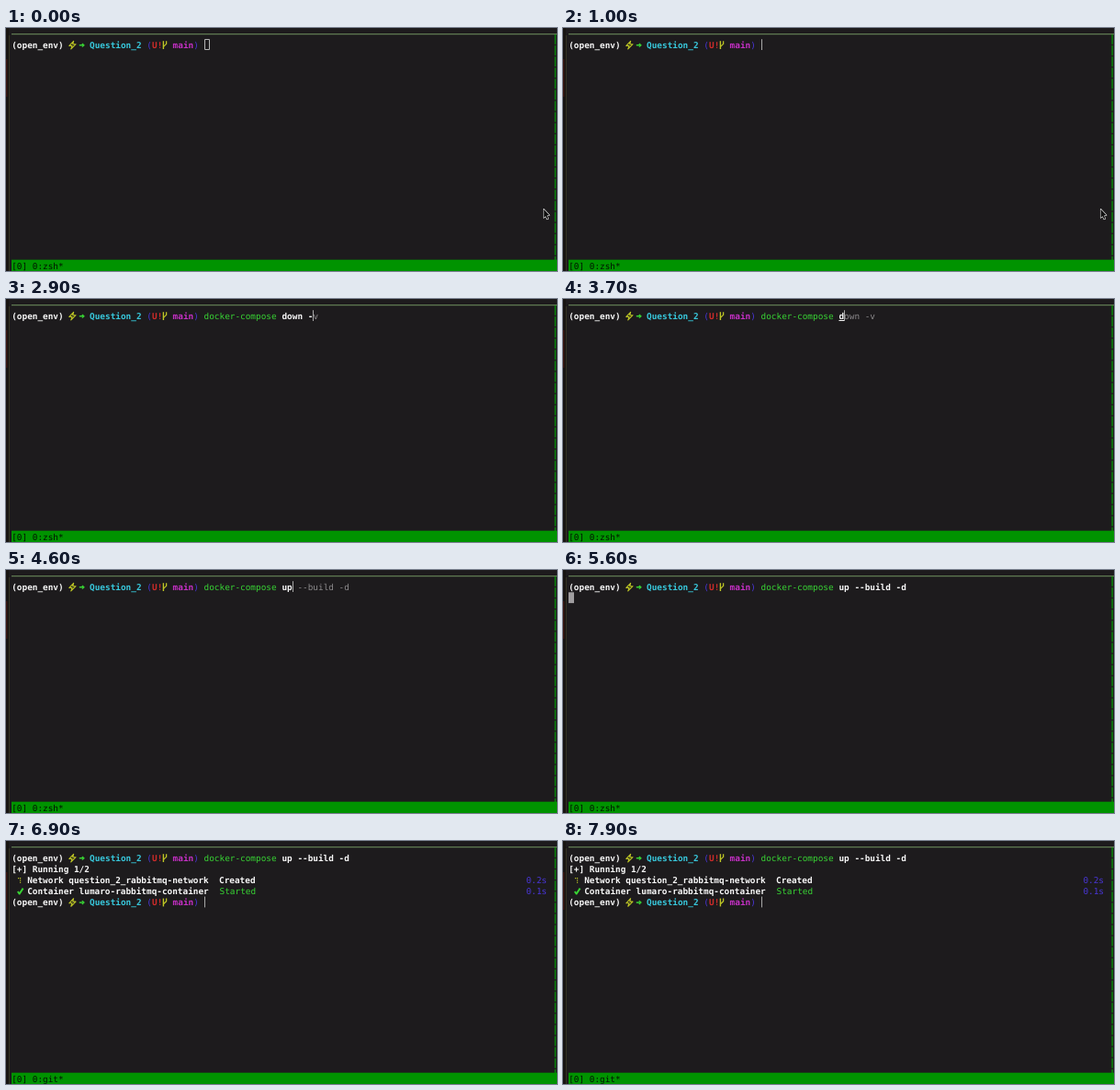
Recreate the animation shown at these times as an HTML page with a canvas. Size 600 by 265 pixels, loop 8000 ms.

```html
<!DOCTYPE html>
<html lang="en">
<head>
<meta charset="utf-8">
<title>Terminal</title>
<style>
html, body { margin: 0; width: 100%; height: 100%; overflow: hidden; background: #1d1b1d; }
canvas { display: block; }
</style>
</head>
<body>
<canvas id="stage" width="600" height="265"></canvas>
<script>
const ctx = document.getElementById('stage').getContext('2d');
const LOOP = 8000;
const FONT_SIZE = 9.4, CELL = FONT_SIZE * 0.602;
const LEFT = 6.2, ROW = 12.1, BASELINE = 22;
const COLOR = {
  white: '#f8f8f8', gray: '#8c8a8c', green: '#38d334', cyan: '#38c8dc', blue: '#4936d8',
  red: '#d02c2a', yellow: '#bec625', magenta: '#c630c6', bar: '#009300'
};

const DOWN = 'docker-compose down -v';
const UP = 'docker-compose up --build -d';
// Each step: start time, number of typed characters, full suggested command.
const STEPS = [
  [0, 0, ''], [1600, 1, DOWN], [1800, 2, DOWN], [2100, 22, DOWN],
  [2900, 21, DOWN], [3200, 20, DOWN], [3300, 19, DOWN], [3400, 18, DOWN],
  [3500, 17, DOWN], [3700, 16, DOWN], [4000, 15, DOWN],
  [4400, 16, UP], [4500, 17, UP], [4900, 28, UP]
];
const FOCUS = 300, POINTER_HIDDEN = 1400, ENTER = 5600, OUTPUT = 5900, DONE = 6000;
const PROMPT_COLS = 37;

const colX = col => LEFT + col * CELL;
const rowTop = row => 12.2 + row * ROW;

function rect(x, y, w, h, color) {
  ctx.fillStyle = color;
  ctx.fillRect(x, y, w, h);
}

function write(text, col, row, color, weight = 'bold') {
  ctx.font = `${weight} ${FONT_SIZE}px "DejaVu Sans Mono", monospace`;
  ctx.fillStyle = color;
  ctx.fillText(text, colX(col), BASELINE + row * ROW);
}

function trace(points, color, width, close) {
  ctx.beginPath();
  points.forEach(([x, y]) => ctx.lineTo(x, y));
  if (close) ctx.closePath();
  ctx.strokeStyle = color;
  ctx.lineWidth = width;
  ctx.stroke();
}

function drawPrompt(row) {
  write('(open_env)', 0, row, COLOR.white);
  write('Question_2', 15, row, COLOR.cyan);
  write('(', 26, row, COLOR.blue, 'normal');
  write('U!', 27, row, COLOR.red);
  write('main', 31, row, COLOR.magenta);
  write(')', 35, row, COLOR.blue, 'normal');

  ctx.save();
  ctx.translate(0, row * ROW);
  const bolt = [[73.6, 14.3], [68.8, 19.4], [72, 19.4], [70.8, 22.9], [76, 17.7], [72.8, 17.7]];
  trace(bolt, COLOR.yellow, 1.1, true);
  trace([[79.8, 18.7], [84, 18.7]], COLOR.green, 1.5);
  trace([[82.8, 16.9], [85, 18.7], [82.8, 20.5]], COLOR.green, 1.3);
  trace([[171.4, 14.2], [171.4, 23]], COLOR.yellow, 1.4);
  trace([[174.6, 14.2], [174.6, 17.4], [171.4, 20.4]], COLOR.yellow, 1.3);
  ctx.restore();
}

function drawCursor(col, row, style) {
  const x = Math.round(colX(col)), y = rowTop(row);
  if (style === 'hollow') {
    ctx.strokeStyle = '#b5b5b5';
    ctx.lineWidth = 1;
    ctx.strokeRect(x + 0.5, 12.5, 5, 11);
  } else if (style === 'block') {
    rect(x, y, 6, 11.8, '#a09ea0');
  } else {
    rect(x, y, 1, 11.8, '#a8a8a8');
  }
}

function drawCommand(t) {
  const [, count, full] = STEPS.filter(step => step[0] <= t).pop();
  const typed = full.slice(0, count);
  const space = typed.indexOf(' ');
  const command = space < 0 ? typed : typed.slice(0, space);
  write(command, PROMPT_COLS, 0, command === 'do' ? COLOR.yellow : COLOR.green, 'normal');
  write(typed.slice(command.length), PROMPT_COLS + command.length, 0, COLOR.white);
  write(full.slice(count), PROMPT_COLS + count, 0, COLOR.gray, 'normal');
  if (typed.endsWith(' d')) rect(colX(PROMPT_COLS + 15), 23, CELL, 1, COLOR.white);
  if (t < ENTER) drawCursor(PROMPT_COLS + count, 0, t < FOCUS ? 'hollow' : 'bar');
}

function drawOutput() {
  write('[+] Running 1/2', 0, 1, COLOR.white);
  for (const [x, y] of [[13, 40], [15, 40], [15, 42.3], [15, 44.6]]) rect(x, y, 1.2, 1.2, COLOR.yellow);
  write('Network question_2_rabbitmq-network  Created', 3, 2, COLOR.white);
  trace([[12.8, 55], [14.6, 57.6], [18.6, 51.6]], COLOR.green, 1.9);
  write('Container lumaro-rabbitmq-container', 3, 3, COLOR.white);
  write('Started', 40, 3, COLOR.green, 'normal');
  write('0.2s', 99, 2, COLOR.blue, 'normal');
  write('0.1s', 99, 3, COLOR.blue, 'normal');
}

function drawFrame(t) {
  rect(0, 0, 600, 265, '#1d1b1d');
  rect(0, 0, 3, 265, '#171412');
  rect(0, 34, 1.5, 41, '#3a1711');
  rect(3, 8, 1, 257, '#353323');
  rect(6, 6.2, 594, 1, '#70925f');
  for (let y = 7; y < 252; y += ROW) rect(597.4, y, 1.4, 10.8, '#088a0a');
  rect(6, 252.7, 594, 12.3, COLOR.bar);
  write(t < DONE ? '[0] 0:zsh*' : '[0] 0:git*', 0, 19.93, '#001400', 'normal');
}

function drawPointer() {
  const points = [[585.5, 197.5], [585.5, 207], [587.6, 205.2], [589.1, 208.6],
    [590.5, 208], [589.1, 204.6], [591.8, 204.2]];
  trace(points, '#f0f0f0', 1.1, true);
  ctx.fillStyle = '#111';
  ctx.fill();
}

function render(now) {
  const t = now % LOOP;
  drawFrame(t);
  drawPrompt(0);
  drawCommand(t);
  if (t >= OUTPUT) drawOutput();
  if (t >= DONE) {
    drawPrompt(4);
    drawCursor(PROMPT_COLS, 4, 'bar');
  } else if (t >= ENTER) {
    drawCursor(0, t >= OUTPUT ? 4 : 1, 'block');
  }
  if (t < POINTER_HIDDEN) drawPointer();
}

ctx.textRendering = 'geometricPrecision';
ctx.lineJoin = 'round';
const start = performance.now();
function tick() {
  render(performance.now() - start);
  requestAnimationFrame(tick);
}
tick();
</script>
</body>
</html>
```
